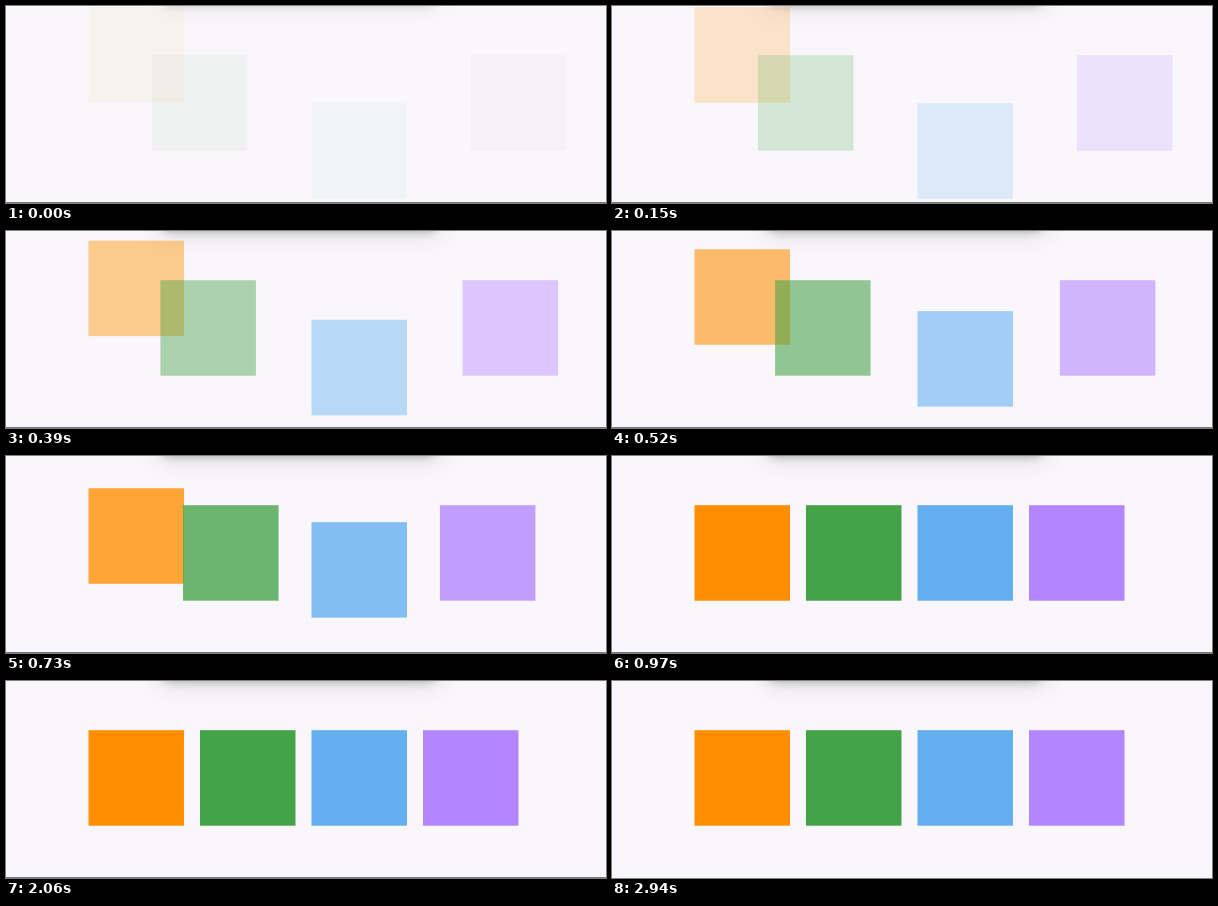
These frames come from a looping animation (600 px wide and 197 px high, 2970 ms). An HTML page with a canvas:

```html
<!DOCTYPE html>
<html lang="en">
<head>
<meta charset="utf-8">
<title>Squares sliding in</title>
<style>
  html, body { margin: 0; width: 100%; height: 100%; overflow: hidden; background: #f9f7fb; }
  canvas { display: block; }
</style>
</head>
<body>
<canvas id="stage" width="600" height="197"></canvas>
<script>
const ctx = document.getElementById('stage').getContext('2d');
const W = 600, H = 197, LOOP = 2970;
const SIZE = 95.5, STEP = 111.5, LEFT = 82.5, TOP = 49.2, TRAVEL = 48;

// Each square slides in from its own direction.
const squares = [
  { color: '#ff8f00', dx: 0, dy: -1 },
  { color: '#44a347', dx: -1, dy: 0 },
  { color: '#63aff0', dx: 0, dy: 1 },
  { color: '#b386ff', dx: 1, dy: 0 }
];

const clamp = v => Math.max(0, Math.min(1, v));

// Casts only the shadow of a card that sits above the stage.
function cardShadow(x, width, bottom, blur, alpha) {
  const away = 400;
  ctx.save();
  ctx.shadowColor = `rgba(0,0,0,${alpha})`;
  ctx.shadowBlur = blur;
  ctx.shadowOffsetY = away;
  ctx.fillStyle = '#000';
  ctx.beginPath();
  ctx.roundRect(x, bottom - 100 - away, width, 100, 8);
  ctx.fill();
  ctx.restore();
}

function draw(t) {
  ctx.globalAlpha = 1;
  ctx.fillStyle = '#f9f7fb';
  ctx.fillRect(0, 0, W, H);

  const shade = 0.45 + 0.55 * clamp(t / 300);
  cardShadow(156, 274, 0, 10, 0.3 * shade);
  cardShadow(152, 284, 2, 28, 0.12 * shade);

  const offset = t >= 970 ? 0 : TRAVEL * (1 - clamp((t - 265) / 720));
  ctx.globalAlpha = clamp(0.05 + t / 1000);
  squares.forEach((s, i) => {
    ctx.fillStyle = s.color;
    ctx.fillRect(LEFT + i * STEP + s.dx * offset, TOP + s.dy * offset, SIZE, SIZE);
  });

  if (t < 2940) {
    ctx.globalAlpha = 1;
    ctx.fillStyle = '#777678';
    ctx.fillRect(0, H - 1, W, 1);
  }
}

const start = performance.now();
function tick() {
  draw((performance.now() - start) % LOOP);
  requestAnimationFrame(tick);
}
tick();
</script>
</body>
</html>
```
